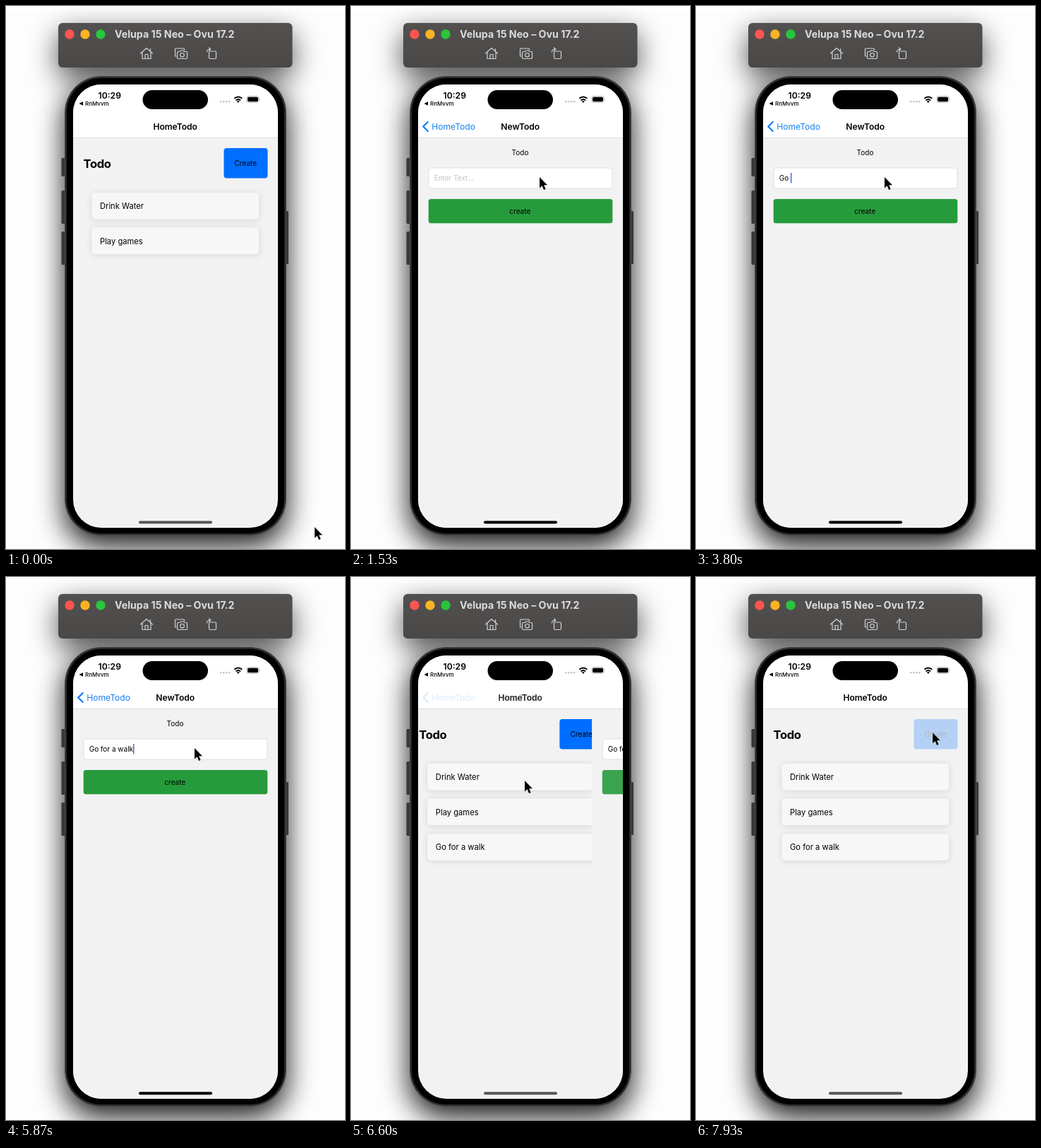
Recreate the animation shown at these times as an HTML page. Size 480 by 768 pixels, loop 8 s.

```html
<!DOCTYPE html>
<html lang="en">
<head>
<meta charset="utf-8">
<title>Todo app</title>
<style>
  html, body { margin: 0; width: 100%; height: 100%; overflow: hidden; background: #fdfdfd; }
  svg { display: block; width: 100vw; height: 100vh; }
  text { font-family: Inter, "Liberation Sans", sans-serif; white-space: pre; }
  .list { font-size: 11.2px; }
  .small { font-size: 10px; }
  .mid { text-anchor: middle; }
  .title { font-size: 12.1px; font-weight: 600; letter-spacing: -.05px; text-anchor: middle; }
  .icon { fill: none; stroke: #d2d2d2; stroke-width: 1.2; stroke-linejoin: round; stroke-linecap: round; }
</style>
</head>
<body>
<svg viewBox="0 0 480 768" preserveAspectRatio="none">
  <defs>
    <filter id="soft" x="-50%" y="-100%" width="200%" height="300%"><feGaussianBlur stdDeviation="20"/></filter>
    <filter id="glow" x="-20%" y="-60%" width="140%" height="220%">
      <feDropShadow dx="0" dy="1" stdDeviation="4" flood-opacity=".13"/>
    </filter>
    <clipPath id="screen"><rect x="95" y="111" width="290" height="627" rx="40"/></clipPath>
    <linearGradient id="bar" x2="0" y2="1">
      <stop offset="0" stop-color="#535150"/><stop offset="1" stop-color="#4a4847"/>
    </linearGradient>
  </defs>

  <rect width="480" height="768" fill="#fdfdfd"/>
  <rect width="480" height="8" fill="#fff"/>

  <!-- window shadows -->
  <rect x="74" y="38" width="331" height="63" rx="8" filter="url(#soft)" opacity=".7"/>
  <rect x="83" y="112" width="314" height="652" rx="50" filter="url(#soft)" opacity=".9"/>

  <!-- simulator toolbar -->
  <rect x="74" y="24" width="331.500" height="63" rx="6" fill="url(#bar)"/>
  <circle cx="90" cy="40" r="6.700" fill="#ff5550"/>
  <circle cx="112" cy="40" r="6.700" fill="#fcb424"/>
  <circle cx="134" cy="40" r="6.700" fill="#28c63c"/>
  <text x="154" y="44.700" font-size="14.200" font-weight="700" fill="#dcdbdb">Velupa 15 Neo – Ovu 17.2</text>
  <g class="icon">
    <path d="M190.500 67 199 59.500 207.500 67M193 65.500V74.500H205V65.500M197 74.500V68.500H201V74.500M204.500 63.500V60.500"/>
    <path d="M241 71H239.500V61Q239.500 60 240.500 60H251.500Q252.500 60 252.500 61V62"/>
    <path d="M244 64.500H246.500L247.500 63H251.500L252.500 64.500H255Q256.500 64.500 256.500 66V73Q256.500 74.500 255 74.500H244Q242.500 74.500 242.500 73V66Q242.500 64.500 244 64.500Z"/>
    <circle cx="249.500" cy="69.300" r="2.800"/>
    <rect x="287.500" y="64" width="10" height="10.500" rx="1.500"/>
    <path d="M284.500 65Q284.500 61 289.500 61M287.500 59 289.800 61 287.500 63"/>
  </g>

  <!-- phone body -->
  <g fill="#383838">
    <rect x="78.500" y="215" width="6" height="26" rx="1.500"/>
    <rect x="78.500" y="261" width="6" height="47" rx="1.500"/>
    <rect x="78.500" y="319" width="6" height="47" rx="1.500"/>
    <rect x="395" y="290" width="5" height="75" rx="1.500"/>
  </g>
  <rect x="83.500" y="99.500" width="313" height="649" rx="51" fill="#2b2b2b" stroke="#4a4a4a"/>
  <rect x="86" y="102" width="308" height="644" rx="49" fill="#000"/>

  <g clip-path="url(#screen)">
    <rect x="95" y="111" width="290" height="627" fill="#f2f2f2"/>
    <g id="home">
      <text x="109.500" y="228.500" font-size="16.600" font-weight="700" letter-spacing="-.4">Todo</text>
      <g id="open">
        <rect x="308.500" y="201" width="62" height="42.500" rx="4" fill="#006eff"/>
        <text class="small mid" x="339.300" y="226">Create</text>
      </g>
      <g id="cards"></g>
    </g>
    <g id="form">
      <rect x="95" y="187" width="290" height="551" fill="#f2f2f2"/>
      <text class="small mid" x="239.500" y="211">Todo</text>
      <rect x="110" y="229" width="260" height="29" rx="3.500" fill="#fff" stroke="#dcdcdc" stroke-width=".9"/>
      <text id="entry" class="small" x="117.700" y="247"></text>
      <rect id="caret" y="236" width="1.400" height="14.500" fill="#3f5fe0"/>
      <g id="submit">
        <rect x="109.700" y="273" width="260.600" height="34.300" rx="3.500" fill="#269b3c"/>
        <text class="small mid" x="239.300" y="293.500">create</text>
      </g>
    </g>

    <!-- navigation and status bars -->
    <rect x="95" y="111" width="290" height="75.500" fill="#fff"/>
    <rect x="95" y="186" width="290" height=".8" fill="#dadada"/>
    <g id="back">
      <path d="M108.800 164 102.200 170.500 108.800 177" fill="none" stroke="#007aff" stroke-width="2.100" stroke-linecap="round" stroke-linejoin="round"/>
      <text x="114.200" y="174.700" font-size="12.100" fill="#1580f2">HomeTodo</text>
    </g>
    <text id="homeTitle" class="title" x="239.700" y="174.700">HomeTodo</text>
    <text id="formTitle" class="title" x="239.700" y="174.700">NewTodo</text>
    <text x="130.500" y="131" font-size="12.200" font-weight="600">10:29</text>
    <path d="M103.500 138 109 135.200V140.800Z"/>
    <text x="112" y="141" font-size="8" font-weight="500">RnMvvm</text>
    <rect x="193.500" y="119" width="92.500" height="27" rx="13.500"/>
    <g fill="#c4c4c4">
      <circle cx="304.300" cy="135.300" r="1.300"/><circle cx="308.300" cy="135.300" r="1.300"/>
      <circle cx="312.300" cy="135.300" r="1.300"/><circle cx="316.300" cy="135.300" r="1.300"/>
    </g>
    <g fill="none" stroke="#000" stroke-width="1.900">
      <path d="M323.300 130.800Q328.800 126.200 334.300 130.800"/>
      <path d="M325.500 133.400Q328.800 130.800 332.100 133.400"/>
    </g>
    <path d="M326.800 134.800Q328.800 133.300 330.800 134.800L328.800 137Z"/>
    <rect x="340.800" y="127.600" width="17.400" height="8.800" rx="2.600" fill="#fff" stroke="#a8a8a8" stroke-width=".8"/>
    <rect x="342" y="128.700" width="15" height="6.600" rx="1.700"/>
    <path d="M359.300 130.700Q360.800 132 359.300 133.300Z" fill="#a8a8a8"/>
    <rect id="indicator" x="188" y="728.300" width="104" height="4" rx="2"/>
  </g>

  <path id="cursor" d="M0 0V15.500L3.600 12.300 6 18 8.600 16.900 6.200 11.300H11Z" stroke="#fff" stroke-width="1" stroke-linejoin="round" paint-order="stroke"/>
</svg>
<script>
const FPS = 15, FRAMES = 120;
const LEAD = 17; // ms, keeps rounding at frame edges on the later frame
const OPEN_AT = 880, CLOSE_AT = 6480;
const PHRASE = "Go for a walk";

const $ = id => document.getElementById(id);
const set = (id, attrs) => {
  for (const key in attrs) $(id).setAttribute(key, attrs[key]);
};

// Tracks are [time, value, ...] rows, linear in between.
const pointer = [
  [0, 437, 737], [133, 340, 225], [1067, 340, 225], [1533, 267, 242],
  [6000, 267, 242], [6267, 246, 288], [6600, 246, 288], [6867, 264, 340],
  [7067, 290, 406], [7333, 318, 300], [7600, 333, 198], [7733, 335, 220]
];
const openPress = [
  [200, 1], [400, .2], [533, .2], [867, 1], [7733, 1], [7800, .6], [7933, .25]
];
const submitPress = [[6200, 1], [6333, .4], [6400, .4], [6640, 1]];
const caretFade = [
  [1800, 0], [1867, 1], [2133, 1], [2467, 0], [2733, 0], [3000, 1],
  [4267, 1], [4467, 0], [4533, 0], [4600, 1]
];
// [time, letters typed]
const typing = [
  [0, 0], [3467, 1], [3533, 2], [3800, 3], [4600, 4], [4733, 5], [4867, 6],
  [5000, 7], [5267, 8], [5333, 9], [5533, 10], [5733, 11], [5867, 13]
];

function track(rows, t) {
  const next = rows.findIndex(row => row[0] > t);
  if (next === 0) return rows[0].slice(1);
  if (next < 0) return rows[rows.length - 1].slice(1);
  const a = rows[next - 1], b = rows[next];
  const k = (t - a[0]) / (b[0] - a[0]);
  return a.slice(1).map((v, i) => v + (b[i + 1] - v) * k);
}

// Critically damped spring from 0 to 1.
function spring(ms) {
  const x = Math.max(0, ms) * .028;
  return 1 - (1 + x) * Math.exp(-x);
}

const pen = document.createElement("canvas").getContext("2d");
pen.font = "10px Inter, 'Liberation Sans', sans-serif";

$("cards").innerHTML = ["Drink Water", "Play games", PHRASE].map((label, i) => {
  const y = 264 + i * 49.6;
  return `<g id="card${i}">
    <rect x="121.500" y="${y}" width="236.500" height="37.500" rx="5" fill="#f7f7f7" filter="url(#glow)"/>
    <text class="list" x="133" y="${y + 23}">${label}</text></g>`;
}).join("");

function draw(t) {
  const p = t < CLOSE_AT ? spring(t - OPEN_AT) : 1 - spring(t - CLOSE_AT);
  set("home", { transform: `translate(${-87 * p} 0)` });
  set("form", { transform: `translate(${290 * (1 - p)} 0)` });
  set("back", { opacity: p });
  set("formTitle", { opacity: p });
  set("homeTitle", { opacity: 1 - p });
  set("indicator", { fill: p > .3 ? "#000" : "#585858" });
  set("card2", { visibility: t >= CLOSE_AT ? "visible" : "hidden" });
  set("open", { opacity: track(openPress, t)[0] });
  set("submit", { opacity: track(submitPress, t)[0] });

  const typed = PHRASE.slice(0, typing.filter(row => row[0] <= t).pop()[1]);
  $("entry").textContent = typed || "Enter Text...";
  set("entry", { fill: typed ? "#000" : "#c4c4c7" });
  set("caret", { x: 117.7 + pen.measureText(typed).width, opacity: track(caretFade, t)[0] });

  set("cursor", { transform: `translate(${track(pointer, t).join(" ")})` });
}

const start = performance.now();
function tick() {
  const elapsed = performance.now() - start + LEAD;
  const frame = Math.floor(elapsed * FPS / 1000) % FRAMES;
  draw(Math.round(frame * 1000 / FPS));
  requestAnimationFrame(tick);
}
tick();
</script>
</body>
</html>
```
